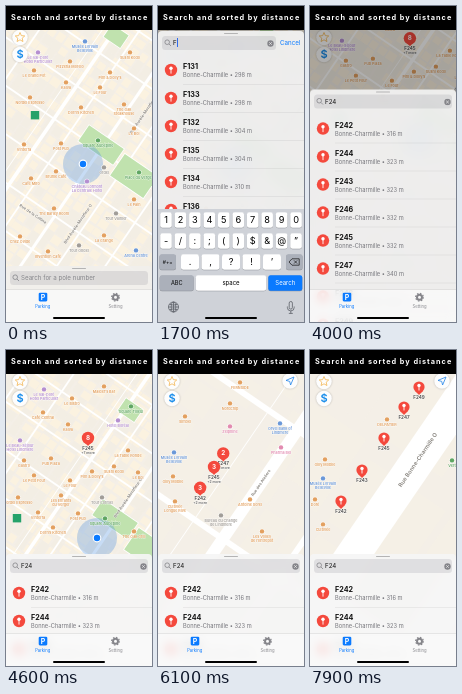
These frames come from a looping animation (146 by 316 pixels, 8 s). An HTML page with a canvas:

```html
<!DOCTYPE html>
<html lang="en">
<head>
<meta charset="utf-8">
<title>Parking pole search</title>
<style>
html, body { margin: 0; width: 100%; height: 100%; overflow: hidden; background: #000; }
#stage { position: relative; width: 146px; height: 316px; overflow: hidden; font: 6.2px Inter, "Liberation Sans", sans-serif; white-space: nowrap; }
#stage > *, #sheet > *, .row > * { position: absolute; }
#map { left: 0; top: 0; width: 146px; height: 316px; }
h1 { margin: 0; left: 0; top: 0; width: 146px; height: 24px; background: #000; color: #fff; font-size: 7.3px; line-height: 23px; letter-spacing: 1px; text-indent: 5px; }
#sheet { left: 0; top: 0; width: 146px; height: 320px; }
#back { left: 0; top: 1.5px; width: 146px; height: 320px; border-radius: 4px 4px 0 0; backdrop-filter: blur(6px); }
#grab { left: 66px; top: 3.5px; width: 14px; height: 1.6px; border-radius: 1px; background: #b4b4b4; }
#field { left: 4px; top: 7px; height: 13.5px; border-radius: 3.5px; background: rgba(118, 118, 128, .17); }
#lens { left: 6px; top: 10px; }
#query { left: 15px; top: 7px; line-height: 14px; }
#caret { top: 9px; width: 1px; height: 9px; background: #2f6cf0; }
#clear { top: 10.5px; }
#cancel { top: 7px; line-height: 14px; color: #0a7aff; }
#list { top: 27px; left: 0; width: 146px; }
.row { position: relative; height: 28px; }
.row b { left: 25px; top: 5.5px; font-size: 7.2px; line-height: 9px; color: #111; }
.row span { left: 25px; top: 15px; font-size: 5.7px; line-height: 7px; color: #74747a; }
.row i { left: 25px; right: 0; bottom: 0; height: .5px; background: rgba(0, 0, 0, .05); }
.row svg { left: 6px; top: 6.5px; }
#tabs { left: 0; top: 284px; background: rgba(249, 249, 249, .85); backdrop-filter: blur(5px); box-shadow: 0 -.4px #ccc; }
#keys { left: 0; top: 203px; }
#home { left: 47px; top: 311px; width: 52px; height: 2px; border-radius: 1px; background: #000; }
</style>
</head>
<body>
<div id="stage">
  <canvas id="map"></canvas>
  <div id="sheet">
    <div id="back"></div><div id="grab"></div><div id="field"></div>
    <svg id="lens" width="8" height="8" fill="none" stroke="#85858a" stroke-width=".8"><circle cx="3.2" cy="3.2" r="2.3"/><path d="M5 5L7 7"/></svg>
    <div id="query"></div><div id="caret"></div>
    <svg id="clear" width="7" height="7"><circle cx="3.5" cy="3.5" r="3.2" fill="#85858a"/><path d="M2.2 2.2l2.6 2.6m0-2.6L2.2 4.8" stroke="#eee" stroke-width=".7"/></svg>
    <div id="cancel">Cancel</div>
    <div id="list"></div>
  </div>
  <svg id="tabs" width="146" height="32" font-size="4.2" text-anchor="middle">
    <rect x="32.7" y="2.8" width="8.6" height="8.6" rx="1.3" fill="#0a7aff"/>
    <text x="37" y="9.6" font-size="7" font-weight="bold" fill="#fff">P</text>
    <text x="36.7" y="18.4" fill="#0a7aff">Parking</text>
    <g fill="none" stroke="#85858a"><circle cx="109.5" cy="7.2" r="2.5" stroke-width="2"/><circle cx="109.5" cy="7.2" r="3.9" stroke-width="1.1" stroke-dasharray="1.5 1.56"/></g>
    <text x="109.5" y="18.4" fill="#85858a">Setting</text>
  </svg>
  <svg id="keys" width="146" height="113" font-size="9.2" text-anchor="middle" overflow="visible"></svg>
  <div id="home"></div>
  <h1>Search and sorted by distance</h1>
</div>
<script>
const $ = id => document.getElementById(id);
const clamp = p => Math.min(1, Math.max(0, p));
const seg = (t, a, b) => clamp((t - a) / (b - a));
const mix = (a, b, p) => a + (b - a) * p;
const ease = p => p < .5 ? 4 * p ** 3 : 1 - 4 * (1 - p) ** 3;
const soft = p => p * p * (3 - 2 * p);

// ---------- keyboard ----------
const rect = (x, y, w, h, fill) => `<rect x="${x}" y="${y}" width="${w}" height="${h}" rx="2.2" fill="${fill}"/>`;
const label = (x, y, s, extra = '') => `<text x="${x}" y="${y}" dy=".35em" ${extra}>${s}</text>`;
const key = (x, y, w, s, fill = '#fff', extra = '') =>
  rect(x - w / 2, y - 7.2, w, 15.4, '#8d9096') + rect(x - w / 2, y - 7.7, w, 15.4, fill) + label(x, y, s, extra);
const row = (chars, x, y, pitch, w) => [...chars].map((c, i) => key(x + i * pitch, y, w, c)).join('');
const GREY = '#abb0ba', small = 'font-size="6"';

$('keys').innerHTML = `<rect width="146" height="114" fill="#cfd2d8"/>
<g id="abc">${row('QWERTYUIOP', 8, 11, 14.45, 11.6)}${row('ASDFGHJKL', 15.2, 32, 14.45, 11.6)}
${key(9.7, 53, 16.5, '')}<path d="M9.7 49l4.5 4.3h-2.4v3.2H7.6v-3.2H5.2z"/>${row('ZXCVBNM', 29.6, 53, 14.45, 11.6)}
${key(18.7, 74, 34, '123', GREY, small)}</g>
<g id="num">${row('1234567890', 8, 11, 14.45, 11.6)}${row('-/:;()$&@”', 8, 32, 14.45, 11.6)}
${key(9.7, 53, 16.5, '#+=', GREY, 'font-size="5"')}${row('.,?!’', 32, 53, 20.5, 18)}
${key(18.7, 74, 34, 'ABC', GREY, 'font-size="5.6"')}</g>
${key(136.3, 53, 16.5, '', GREY)}
<g fill="none" stroke="#111" stroke-width=".7"><path d="M131 53l3-3.2h7.2v6.4H134zM136 51.4l3.2 3.2m0-3.2L136 54.6"/></g>
${key(73, 74, 70.5, 'space', '#fff', small)}
<g id="go">${key(127.3, 74, 34, 'Search', GREY, small)}</g>
<g fill="none" stroke="#5c6068" stroke-width=".8"><circle cx="15.5" cy="98" r="5"/><ellipse cx="15.5" cy="98" rx="2.3" ry="5"/>
<path d="M10.5 98h10M15.5 93v10M11.5 95.3q4 1.6 8 0M11.5 100.7q4-1.6 8 0M129.4 97.5v1a3.4 3.4 0 0 0 6.8 0v-1M132.8 102v2.4m-2 0h4"/>
<rect x="131.2" y="92.5" width="3.2" height="7.6" rx="1.6"/></g>
<g id="pop"><path fill="#fff" stroke="#b5b8be" stroke-width=".4" d="M-10 -26q0-3 3-3h14q3 0 3 3v14q0 3-2 5t-2 4v9q0 2-2 2h-8q-2 0-2-2v-9q0-2-2-4t-2-5z"/>${label(0, -19, '', 'font-size="14"')}</g>`;

const taps = [['F', 58.5, 32, 1200, 1300], ['2', 22.4, 11, 2000, 2100], ['4', 51.3, 11, 2300, 2400]];

// ---------- result list ----------
const STREET = 'Bonne-Charmille';
const results = {
  F: 'F131 298,F133 298,F132 304,F135 304,F134 310,F136 310,F137 314',
  F2: 'F240 308,F242 316,F244 323,F243 323,F246 332,F245 332,F247 340',
  F24: 'F242 316,F244 323,F243 323,F246 332,F245 332,F247 340,F248 340,F249 348'
};
let shown = '';
function fillList(name) {
  if (name === shown) return;
  shown = name;
  $('list').innerHTML = !name ? '' : results[name].split(',').map(r => {
    const [pole, far] = r.split(' ');
    return `<div class="row"><svg width="14" height="14"><circle cx="7" cy="7" r="6.2" fill="#f4493d"/><circle cx="7" cy="5.2" r="1.7" fill="#fff"/><path d="M7 6v4.6" stroke="#fff" stroke-width=".9"/></svg><b>${pole}</b><span>${STREET} • ${far} m</span><i></i></div>`;
  }).join('');
}

// ---------- map ----------
const ctx = $('map').getContext('2d');
const FONT = 'Inter, "Liberation Sans", sans-serif';
const ANGLE = -55.6 * Math.PI / 180;
const COLORS = { o: '#e3a05f', p: '#b58fd0', b: '#6b98d8', k: '#e28bb0', g: '#5fa662', y: '#a19d98', m: '#25a26a' };

// Camera: place of pole F245 on the stage, and scale
const camA = { x: 68, y: 58, s: .1 }, camB = { x: 82, y: 88, s: .1 };
const camC = { x: 56, y: 117, s: .33 }, camD = { x: 74, y: 88, s: 1 };

const places = [
  { cam: camA, list: [
    [79, 41, 'b', 'Musée Lorvain|Belleville'], [32, 52, 'p', 'Le Val-Doré|Hotel Particulier'], [28, 70, 'o', 'Le Grand Pot'], [29, 115, 'm', ''],
    [104, 72, 'o', 'Pim & Dolly’s'], [64, 61, 'o', 'Pizzeria Morelo'], [24, 97, 'o', 'Nordel Espresso'], [118, 104, 'o', 'The Oak|Steakhouse'],
    [75, 107, 'o', 'Dorn’s Kitchen'], [55, 143, 'o', 'Post Pub'], [92, 140, 'g', 'Square Aubépine'], [98, 167, 'y', 'Ordel'],
    [81, 181, 'p', 'Château Lormont|La Centrale Hotel'], [133, 172, 'g', 'Place du Verger'], [48, 208, 'o', 'The Barley Room'],
    [25, 178, 'o', 'Café Miro'], [110, 213, 'y', 'Tour Valmer'], [42, 251, 'o', 'Invention Café'], [130, 250, 'b', 'Arena Centre'],
    [124, 52, 'o', 'Sushi Kodo'], [60, 82, 'o', 'Kalva'], [94, 87, 'o', 'Le Four'], [18, 144, 'o', 'Vinterra'], [128, 128, 'o', 'Le Bol'],
    [50, 171, 'o', 'Brume Café'], [98, 235, 'o', 'La Grange'], [14, 236, 'o', 'Chez Ovide'], [128, 199, 'o', 'Le Pain'], [73, 245, 'y', 'Tour Ondel'] ] },
  { cam: camB, list: [
    [98, 42, 'o', 'Malder’s Bar'], [38, 45, 'p', 'Le Val-Doré|Hotel Particulier'], [125, 62, 'g', 'Square Tilleul'], [112, 76, 'p', 'Hotel Boréal'],
    [37, 68, 'o', 'Café Central'], [14, 96, 'p', 'Le Beau-Séjour|Hotel Lindmere'], [45, 114, 'o', 'Pub Plaza'], [122, 106, 'o', 'La Table Ronde'],
    [86, 127, 'o', 'Pim & Dolly’s'], [28, 131, 'o', 'Le Petit Four'], [12, 153, 'o', 'Nordel Espresso'], [55, 151, 'o', 'Les Enfants|du Verger'],
    [96, 153, 'y', 'Tour Cormel'], [99, 174, 'g', 'Square Aubépine'], [47, 183, 'o', 'Dorn’s Kitchen'], [128, 187, 'o', 'The Oak Grill'], [11, 174, 'm', ''],
    [66, 54, 'o', 'Le Bistro'], [62, 80, 'o', 'Kalva'], [18, 116, 'o', 'Gastro'], [108, 122, 'o', 'Sushi Kodo'], [64, 136, 'o', 'Le Four'],
    [32, 168, 'o', 'Vinterra'], [72, 169, 'o', 'Post Pub'], [132, 128, 'o', 'Le Bol'] ] },
  { cam: camC, list: [
    [82, 38, 'o', 'FERNSIDE'], [72, 59, 'o', 'Nordchip'], [122, 79, 'b', 'Orvel Bank of|Lindmere'], [27, 72, 'o', 'Simbel'], [72, 82, 'k', 'Zelphine'],
    [123, 103, 'k', 'Pharma Bel'], [16, 108, 'b', 'Musée Lorvain|Belleville'], [15, 132, 'o', 'Gilly Mobile'], [17, 157, 'o', 'Cultivée|Longue Rive'],
    [63, 171, 'y', 'Bureau du Change|de Lindmere'], [92, 155, 'o', 'Antoine Sorel'], [104, 187, 'o', 'Les Voiles|de l’Entrepôt'] ] },
  { cam: camD, list: [
    [77, 75, 'o', 'DELPATIER'], [15, 115, 'o', 'Gilly Mobile'], [13, 134, 'b', 'Musée Lorvain|Belleville'], [5, 155, 'o', 'Doré'],
    [13, 180, 'o', 'Cultivée'], [142, 116, 'g', 'Vert'] ] }
];
const roadNames = [
  [camA, 72, 218, 0, 'Blvd Aurèle-Montfleur O'], [camA, 138, 108, 0, 'Blvd Aurèle-Montfleur O'], [camA, 27, 208, 90, 'Rue de la Colline'],
  [camB, 122, 148, 0, 'Blvd Aurèle-Montfleur O'], [camC, 103, 133, 0, 'Rue des Ateliers'], [camD, 108, 110, 0, `Rue ${STREET} O`]
];
// Offset from F245 at full scale, count and name, by zoom level
const pins = [
  [[0, 0, 8, 'F245']],
  [[28, -41, 2, 'F247'], [0, 0, 3, 'F245'], [-42, 63, 3, 'F242']],
  [[35, -51, 1, 'F249'], [20, -31, 1, 'F247'], [0, 0, 1, 'F245'], [-22, 32, 1, 'F243'], [-43, 63, 1, 'F242']]
];

function camera(t) {
  if (t < 3300) return camA;
  if (t < 5200) {
    const p = ease(seg(t, 3600, 4524));
    return { x: mix(108.6, 82, p), y: mix(5.2, 88, p), s: .1 };
  }
  const [a, b, p] = t < 6100 ? [camB, camC, soft(seg(t, 5200, 6100))] : [camC, camD, soft(seg(t, 6100, 7900))];
  return { x: mix(a.x, b.x, p), y: mix(a.y, b.y, p), s: a.s * (b.s / a.s) ** p };
}

function disc(x, y, r, fill) {
  ctx.fillStyle = fill;
  ctx.beginPath();
  ctx.arc(x, y, r, 0, 7);
  ctx.fill();
}
function write(s, x, y, size, fill, weight = 600, halo = true) {
  ctx.font = `${weight} ${size}px ${FONT}`;
  ctx.strokeStyle = 'rgba(255,255,255,.7)';
  ctx.lineWidth = .8;
  if (halo) ctx.strokeText(s, x, y);
  ctx.fillStyle = fill;
  ctx.fillText(s, x, y);
}
const noise = (i, j) => { const v = Math.sin(i * 12.99 + j * 78.23) * 43758.5; return v - Math.floor(v); };

function drawGround(cam) {
  const street = (vertical, at, w) => {
    w = Math.max(w, .8 / cam.s);
    vertical ? ctx.fillRect(at - w / 2, -2600, w, 5200) : ctx.fillRect(-2600, at - w / 2, 5200, w);
  };
  ctx.save();
  ctx.translate(cam.x, cam.y);
  ctx.rotate(ANGLE);
  ctx.scale(cam.s, cam.s);
  ctx.globalAlpha = mix(.8, .12, seg(cam.s, .1, .3));
  for (let i = -24; i < 24; i++) for (let j = -24; j < 24; j++) {
    const n = noise(i, j);
    ctx.fillStyle = n < .6 ? '#fdf3df' : '#f3ede4';
    ctx.fillRect(i * 100, j * 100, 70 + 34 * n, 70 + 30 * noise(j, i));
  }
  ctx.globalAlpha = 1;
  ctx.fillStyle = '#fff';
  for (let a = -2165; a < 2500; a += 400) street(true, a, 18);
  [-1300, -900, -480, 350, 1000, 1400].forEach(b => street(false, b, 18));
  street(false, 145, 36);
  street(false, 40.5, 34 * seg(cam.s, .33, .8));
  street(false, 700, 30);
  for (const [a, b, w, h] of [[-515, 681, 190, 420], [-585, 1128, 260, 400], [468, 190, 150, 200]]) {
    ctx.fillStyle = '#fff';
    ctx.fillRect(a - w / 2 - 8, b - h / 2 - 8, w + 16, h + 16);
    ctx.fillStyle = '#c0e2ae';
    ctx.fillRect(a - w / 2, b - h / 2, w, h);
  }
  ctx.restore();
}

function drawPin(x, y, count, name) {
  ctx.fillStyle = '#f4493d';
  ctx.beginPath();
  ctx.moveTo(x - 4, y + 4);
  ctx.lineTo(x, y + 8);
  ctx.lineTo(x + 4, y + 4);
  ctx.fill();
  disc(x, y, count > 1 ? 6.2 : 5.6, '#f4493d');
  if (count > 1) write(count, x, y, 6.3, '#fff', 700, false);
  else {
    disc(x, y - 1.5, 1.7, '#fff');
    ctx.fillRect(x - .45, y - 1, .9, 4.5);
  }
  write(name, x, y + 10.5, 4.6, '#444');
  if (count > 1) write(`+${count - 1} more`, x, y + 15, 3.4, '#666');
}

function drawButtons(t) {
  const button = (x, y) => {
    ctx.shadowColor = 'rgba(0,0,0,.25)';
    ctx.shadowBlur = 2;
    disc(x, y, 7.8, '#fdfdfd');
    ctx.shadowBlur = 0;
  };
  button(14, 31.5);
  ctx.beginPath();
  for (let i = 0; i < 10; i++) {
    const r = i % 2 ? 2.3 : 5, a = i * Math.PI / 5 - Math.PI / 2;
    ctx.lineTo(14 + r * Math.cos(a), 31.5 + r * Math.sin(a));
  }
  ctx.closePath();
  ctx.strokeStyle = '#f3b755';
  ctx.lineWidth = .8;
  ctx.stroke();
  button(14, 48.5);
  write('$', 14, 48.8, 11, '#168bea', 600, false);
  if (t < 5500) return;
  button(132, 31);
  ctx.beginPath();
  [[136, 27], [132.6, 35], [131.7, 31.4], [128, 30.4]].forEach(p => ctx.lineTo(...p));
  ctx.closePath();
  ctx.strokeStyle = '#2384ea';
  ctx.lineWidth = .8;
  ctx.stroke();
}

function drawMap(t, top) {
  const cam = camera(t), { s } = cam;
  const level = t < 3300 ? 0 : s < .19 ? 1 : s < .55 ? 2 : 3;
  const dpr = window.devicePixelRatio || 1;
  if (ctx.canvas.width !== 146 * dpr) { ctx.canvas.width = 146 * dpr; ctx.canvas.height = 316 * dpr; }
  ctx.setTransform(dpr, 0, 0, dpr, 0, 0);
  ctx.textAlign = 'center';
  ctx.textBaseline = 'middle';
  ctx.lineJoin = 'round';
  ctx.fillStyle = '#f4efe7';
  ctx.fillRect(0, 0, 146, 316);
  drawGround(cam);

  const at = (ref, x, y) => [cam.x + (x - ref.x) * s / ref.s, cam.y + (y - ref.y) * s / ref.s];
  const { cam: ref, list } = places[level];
  const ux = cam.x + 90 * s, uy = cam.y + 1000 * s;
  disc(ux, uy, 200 * s, 'rgba(70,140,220,.3)');
  for (const [c, x, y, turn, name] of roadNames) if (c === ref) {
    ctx.save();
    ctx.translate(...at(c, x, y));
    ctx.rotate(ANGLE + turn * Math.PI / 180);
    write(name, 0, 0, level === 3 ? 5.7 : 4, '#85817b');
    ctx.restore();
  }
  for (const [x, y, c, name] of list) {
    const [px, py] = at(ref, x, y), color = COLORS[c];
    if (c === 'm') {
      ctx.fillStyle = color;
      ctx.fillRect(px - 4.2, py - 10, 8.4, 8.4);
      continue;
    }
    disc(px, py - 5.6, 2.6, '#fff');
    disc(px, py - 5.6, 2.2, color);
    name.split('|').forEach((line, i) => write(line, px, py + i * 4, 3.7, color));
  }
  disc(ux, uy, 4.4, '#fff');
  disc(ux, uy, 3.2, '#0a7aff');
  if (level) for (const [x, y, n, name] of pins[level - 1]) drawPin(cam.x + x * s, cam.y + y * s, n, name);
  drawButtons(t);
  ctx.fillStyle = `rgba(0,0,0,${.32 * clamp((200 - top) / 119)})`;
  ctx.fillRect(0, 0, 146, 316);
}

// ---------- timeline ----------
function draw(t) {
  const out = t >= 3300;
  const top = out ? mix(23, 202, ease(seg(t, 3600, 4524))) : mix(258, 23, ease(seg(t, 100, 1060)));
  const keysY = out ? 113 * ease(seg(t, 3300, 3800)) : 113 * (1 - ease(seg(t, 400, 1085)));
  const narrow = out ? 1 - ease(seg(t, 3300, 3700)) : ease(seg(t, 450, 850));
  const query = t < 1300 ? '' : t < 2000 ? 'F' : t < 2300 ? 'F2' : 'F24';
  drawMap(t, top);

  $('sheet').style.transform = `translateY(${top}px)`;
  $('back').style.background = query ? 'rgba(246,246,245,.9)' : 'rgba(240,239,236,.84)';
  $('field').style.width = mix(138, 114, narrow) + 'px';
  $('clear').style.left = mix(133.5, 108.5, narrow) + 'px';
  $('clear').style.display = query ? '' : 'none';
  $('cancel').style.left = mix(148, 122, narrow) + 'px';
  $('query').textContent = query || 'Search for a pole number';
  $('query').style.color = query ? '#111' : '#85858a';
  $('caret').style.left = [14.5, 19, 22.8, 27][query.length] + 'px';
  $('caret').style.opacity = t < 500 || out ? 0 : 1 - seg(t, 2700, 3000);
  fillList(t < 1400 ? '' : t < 2100 ? 'F' : t < 2600 ? 'F2' : 'F24');

  const keys = $('keys');
  keys.style.display = keysY < 113 ? '' : 'none';
  keys.style.transform = `translateY(${keysY}px)`;
  $('abc').style.display = t < 1700 ? '' : 'none';
  $('num').style.display = t < 1700 ? 'none' : '';
  $('go').children[1].setAttribute('fill', query ? '#0a7aff' : GREY);
  $('go').children[2].setAttribute('fill', query ? '#fff' : '#7d828b');
  const tap = taps.find(k => t >= k[3] && t < k[4]);
  $('pop').style.display = tap ? '' : 'none';
  if (tap) {
    $('pop').setAttribute('transform', `translate(${tap[1]} ${tap[2]})`);
    $('pop').lastChild.textContent = tap[0];
  }
}

const start = performance.now();
function tick() {
  draw((performance.now() - start) % 8000);
  requestAnimationFrame(tick);
}
tick();
</script>
</body>
</html>
```
